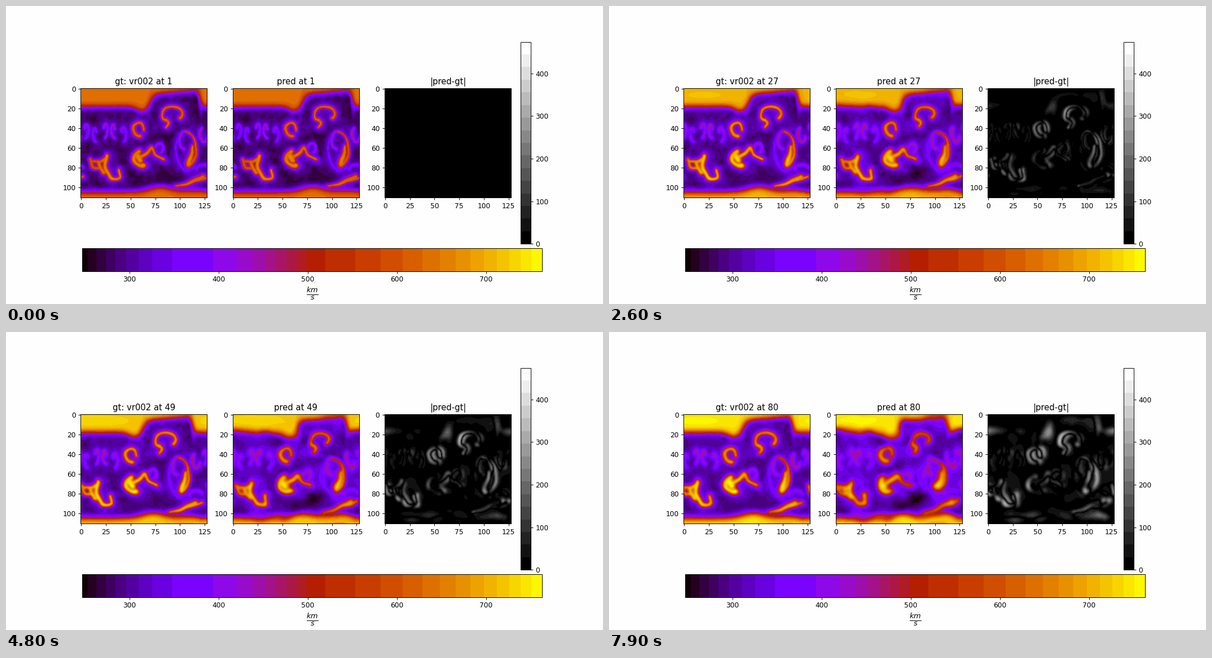
These frames come from a looping animation (1058x529 px, 8000 ms). A matplotlib script:

```python
import numpy as np
import matplotlib.pyplot as plt
from matplotlib.animation import FuncAnimation
from matplotlib.cm import ScalarMappable
from matplotlib.colors import ListedColormap, Normalize

STAGE_W, STAGE_H, DPI = 1058, 529, 88.17
W, H = 128, 111
FRAMES = 80
V_MIN, V_MAX, ERR_MAX = 247.2, 762.7, 474
LOW = 271

rng = np.random.default_rng(7)
gx, gy = np.meshgrid(np.arange(W, dtype=float), np.arange(H, dtype=float))


def blur(a, sx, sy):
    kx, ky = np.fft.fftfreq(W), np.fft.fftfreq(H)[:, None]
    gain = np.exp(-2 * np.pi**2 * ((sx * kx) ** 2 + (sy * ky) ** 2))
    return np.fft.ifft2(np.fft.fft2(a) * gain).real


def noise(size):
    a = blur(rng.standard_normal((H, W)), size, size)
    return a / a.std()


def bell(x, mid, width):
    return np.exp(-(((x - mid) / width) ** 2))


def sigmoid(x):
    return 1 / (1 + np.exp(-np.clip(x, -40, 40)))


xx = gx + 0.5 * noise(4)
yy = gy + 0.5 * noise(4)
core = np.zeros((H, W))
halo = np.zeros((H, W))


def line(*pts):
    """Smooth curve through the key points."""
    p = np.array(pts, float)
    q = np.vstack([2 * p[0] - p[1], p, 2 * p[-1] - p[-2]])
    u = np.linspace(0, 1, 14)[:, None]
    return np.vstack([
        0.5 * (2 * b + (c - a) * u + (2 * a - 5 * b + 4 * c - d) * u**2
               + (3 * b - a - 3 * c + d) * u**3)
        for a, b, c, d in zip(q, q[1:], q[2:], q[3:])
    ])


def arc(cx, cy, rx, ry, start, end, curl=1.0):
    """Elliptic arc in degrees, 90 pointing down; curl scales its far end."""
    t = np.radians(np.linspace(start, end, 50))
    r = np.linspace(1, curl, 50)
    return np.column_stack([cx + rx * r * np.cos(t), cy + ry * r * np.sin(t)])


def stroke(path, amp, w0, w1):
    w = np.linspace(w0, w1, len(path))
    dx = (xx[..., None] - path[:, 0] + W / 2) % W - W / 2
    d = np.hypot(dx, yy[..., None] - path[:, 1])
    glow = 60 if amp > 180 else 36
    np.maximum(core, amp * np.exp(-(d / w).min(-1) ** 3), out=core)
    np.maximum(halo, glow * np.exp(-(d / (w + 3)).min(-1) ** 2), out=halo)


def draw_plumes():
    # mushroom loop
    stroke(arc(93, 26, 10.5, 7.5, 125, 400, 0.85), 275, 1.8, 2.2)
    stroke(line((87, 31), (89, 35), (85.5, 40)), 270, 2, 1.3)
    # long blade with its curl
    stroke(arc(104, 62, 11.5, 19, -85, 60), 260, 1.2, 2.4)
    stroke(line((112, 59), (109, 77)), 300, 1.8, 3.7)
    stroke(arc(104, 52, 5, 9, 270, 95), 120, 1.3, 1.1)
    stroke(arc(108, 62, 13, 21, 60, 230), 45, 1.2, 1.2)
    # lower right tongue
    stroke(line((95, 100), (108, 96), (123, 88.5)), 275, 1.2, 2.9)
    stroke(line((106, 97), (118, 93), (130, 89)), 265, 1.3, 1.8)
    # middle hook
    stroke(arc(58, 42, 4.5, 7, 365, 80), 275, 1.6, 2.4)
    # centre plume
    stroke(arc(61, 71, 6.5, 7.5, 250, 60), 305, 3, 3.2)
    stroke(line((58, 68), (61, 73)), 310, 4.2, 3.8)
    stroke(line((60, 70), (66, 66), (71, 60.5), (75, 68), (83, 73)), 280, 2.8, 1.7)
    # left plume
    stroke(line((9, 72), (13, 80), (21, 80)), 275, 2.2, 2.2)
    stroke(line((12, 74), (20, 73), (26, 69)), 280, 2, 2.6)
    stroke(line((18, 74), (23, 85)), 300, 3, 2.6)
    stroke(line((26, 68), (25, 79), (30, 91), (39, 91), (38, 83)), 305, 2.8, 1.8)


def draw_curls():
    for k in range(5):
        turn = 250 if k % 2 else -250
        cy = 43 + rng.uniform(-3, 3)
        stroke(arc(5 + 9.5 * k, cy, 3.5, 9, 90, 90 + turn, 0.35),
               rng.uniform(70, 130), 1.2, 1.4)
    stroke(arc(124, 46, 4, 8, 230, 20), 130, 1.4, 1.2)
    stroke(arc(79, 61, 4, 5, 200, 420), 90, 1.2, 1.2)
    stroke(arc(124, 82, 7, 5, 180, 340), 70, 1.3, 1.3)


def sheet(field, dist, gold):
    """Lay a hot region where dist is below zero, with a violet rim."""
    mix = sigmoid(-dist / 1.3)
    return (field + 85 * bell(dist, 0, 4.5)) * (1 - mix) + gold * mix


def slant(b):
    return np.hypot(1, (np.roll(b, -1) - np.roll(b, 1)) / 2)


def make_field():
    f = LOW + 5 * noise(2) + 7 * noise(5) + core + halo + 0.5 * blur(halo, 6, 5)
    f -= 45 * bell(gx, 84 + (gy - 52) * 0.27, 1.2) * bell(gy, 63, 10)
    x = gx[0]
    arch = sigmoid((x - 69.5) / 2) * sigmoid((120 - x) / 1.3)
    top = 18 + 4.5 * bell(x, 62, 8) - arch * (14.5 + 0.1 * (x - 95))
    low = 105.5 - 5 * bell(x, 80, 14) - 1.5 * bell(x, 115, 15)
    f = sheet(f, (gy - top) / slant(top), 632 + 16 * bell(gx, 26, 34) * bell(gy, 7, 7))
    return sheet(f, (low - gy) / slant(low), 624 + 16 * bell(gx, 76, 24) * bell(gy, 108, 6))


draw_plumes()
draw_curls()
field = make_field()
bend_x, bend_y, murk = noise(5), noise(5), noise(5)
rise = (70 * bell(gx, 106, 13) * bell(gy, 9, 6)
        + 100 * bell(gx, 44, 24) * bell(gy, 102, 3)
        + 70 * bell(gx, 58, 9) * bell(gy, 19, 9))


def sample(dx, dy):
    x, y = gx + dx, np.clip(gy + dy, 0, H - 1.001)
    i, j = np.floor(x).astype(int), np.floor(y).astype(int)
    u, v = x - i, y - j
    i, k = i % W, (i + 1) % W
    return ((field[j, i] * (1 - u) + field[j, k] * u) * (1 - v)
            + (field[j + 1, i] * (1 - u) + field[j + 1, k] * u) * v)


def evolve(s, dx, dy, soft):
    a = blur(sample(dx, dy), soft, soft)
    return a + s**0.42 * (18 + 0.27 * np.maximum(a - 310, 0))


def states(n):
    s = n / (FRAMES - 1)
    drift = 11 * s**0.72 * (1 + 0.13 * np.cos(2 * np.pi * (gx - 20) / W))
    lag = 2.8 * s**0.55
    gt = evolve(s, drift, 0 * gy, 0.4 + 0.75 * s)
    pred = evolve(s, drift - lag + 1.3 * s * bend_x, 1.3 * s * bend_y,
                  0.4 + 1.2 * s**0.8)
    room = np.clip((700 - pred) / 250, 0.1, 1)
    return gt, pred + s**0.7 * room * (14 + 17 * murk + rise)


def banded(cmap, count):
    """Cut a colormap into bands of equal colour change, green counting double."""
    rgb = cmap(np.linspace(0, 1, cmap.N))[:, :3]
    step = np.linalg.norm(np.diff(rgb, axis=0) * [1, 2, 1], axis=1)
    run = np.append(0, np.cumsum(step))
    run /= run[-1]
    band = np.minimum(np.floor(run * count), count - 1)
    return ListedColormap(rgb[np.searchsorted(run, (band + 0.5) / count)])


heat = banded(plt.get_cmap("gnuplot", 1024), 30)
gray = plt.get_cmap("gray", 16)

fig = plt.figure(figsize=(12, 6), dpi=DPI, facecolor="#fefefe")


def box(left, top, right, bottom):
    return fig.add_axes([left / STAGE_W, 1 - bottom / STAGE_H,
                         (right - left) / STAGE_W, (bottom - top) / STAGE_H])


def panel(col, cmap, lo, hi):
    left = 132.4 + 269.3 * col
    ax = box(left, 145.9, left + 224, 340.3)
    im = ax.imshow(field, cmap=cmap, vmin=lo, vmax=hi, aspect="auto")
    ax.set_xticks(range(0, 126, 25))
    ax.set_yticks(range(0, 101, 20))
    return ax, im


ax_gt, im_gt = panel(0, heat, V_MIN, V_MAX)
ax_pred, im_pred = panel(1, heat, V_MIN, V_MAX)
ax_err, im_err = panel(2, gray, 0, ERR_MAX)
ax_err.set_title("|pred-gt|")

wide = fig.colorbar(ScalarMappable(Normalize(V_MIN, V_MAX), heat),
                    cax=box(135.3, 430.2, 950, 470.8), orientation="horizontal",
                    ticks=range(300, 701, 100))
wide.set_label(r"$\frac{km}{s}$", fontsize=15)
fig.colorbar(ScalarMappable(Normalize(0, ERR_MAX), gray),
             cax=box(912, 63.6, 929.7, 422.3), ticks=range(0, 401, 100))


def update(n):
    gt, pred = states(n)
    im_gt.set_data(gt)
    im_pred.set_data(pred)
    im_err.set_data(np.abs(pred - gt))
    ax_gt.set_title(f"gt: vr002 at {n + 1}")
    ax_pred.set_title(f"pred at {n + 1}")
    return im_gt, im_pred, im_err


anim = FuncAnimation(fig, update, frames=FRAMES, interval=100,
                     repeat=True, repeat_delay=0, blit=False)
plt.show()
```
